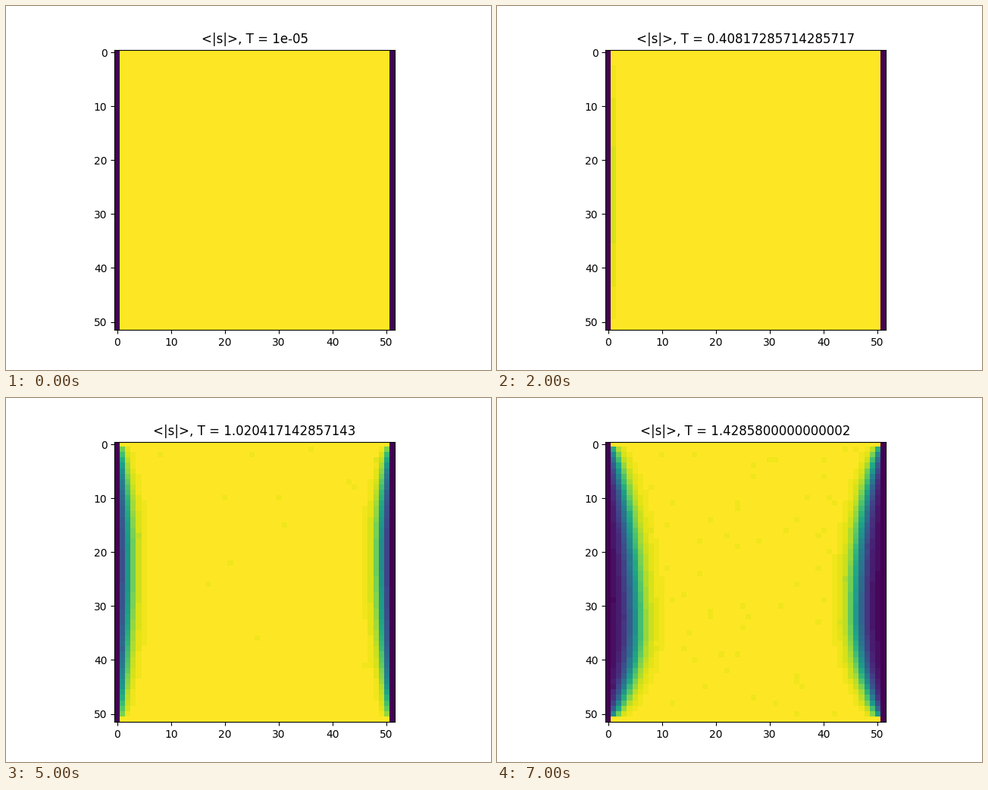
These frames come from a looping animation (640x480 px, 8 s). A matplotlib script:

```python
import numpy as np
import matplotlib.pyplot as plt
from matplotlib.animation import FuncAnimation

N = 52
STEPS = 8
SAMPLES = 50
TEMPS = np.linspace(1e-5, 10, 50)[:STEPS]

# Greatest wall depth in cells and the row where it lies, for each step.
# A negative depth keeps the wall closed.
LEFT_DEPTH = [-1, -1, 0.06, 1, 1.9, 1.95, 2.6, 5]
LEFT_ROW = [27, 27, 27, 27, 27, 22, 30, 34]
RIGHT_DEPTH = [-1, -1, -1, 0.85, 1.75, 2.05, 4.8, 4.8]
RIGHT_ROW = [21, 21, 21, 21, 21, 20, 22, 31]

# Round kerning to whole pixels.
plt.rcParams["text.kerning_factor"] = 6


def wall(depth, peak, width):
    """Mean order per cell, by distance from the fixed edge column."""
    rows = np.arange(N)[:, None]
    reach = np.interp(rows, [0, peak, N - 1], [0, 1, 0])
    bulge = np.sin(reach * np.pi / 2) ** 0.65
    x = np.arange(N) - depth * bulge
    return 1 / (1 + np.exp(-x / (width * (1 + bulge) / 2)))


def field(step):
    heat = max(step, 1)
    left = wall(LEFT_DEPTH[step], LEFT_ROW[step], 0.17 * heat)
    right = wall(RIGHT_DEPTH[step], RIGHT_ROW[step], 0.15 * heat)
    grid = np.minimum(left, right[:, ::-1])
    grid = np.round(grid * SAMPLES) / SAMPLES

    # Single cells flip more often as the temperature rises.
    flips = np.random.default_rng(step).random((N, N))
    grid -= (flips < 0.035 * (step / 7) ** 5) / SAMPLES

    grid[[0, -1]] = 1
    grid[:, [0, -1]] = 0
    return grid


fig, ax = plt.subplots(figsize=(6.4, 4.8), dpi=100)
image = ax.imshow(field(0), cmap="viridis", vmin=0, vmax=1)
title = ax.set_title("")


def draw(step):
    image.set_data(field(step))
    title.set_text(f"<|s|>, T = {TEMPS[step]}")
    return image, title


anim = FuncAnimation(fig, draw, frames=STEPS, interval=1000, repeat=True)
plt.show()
```
